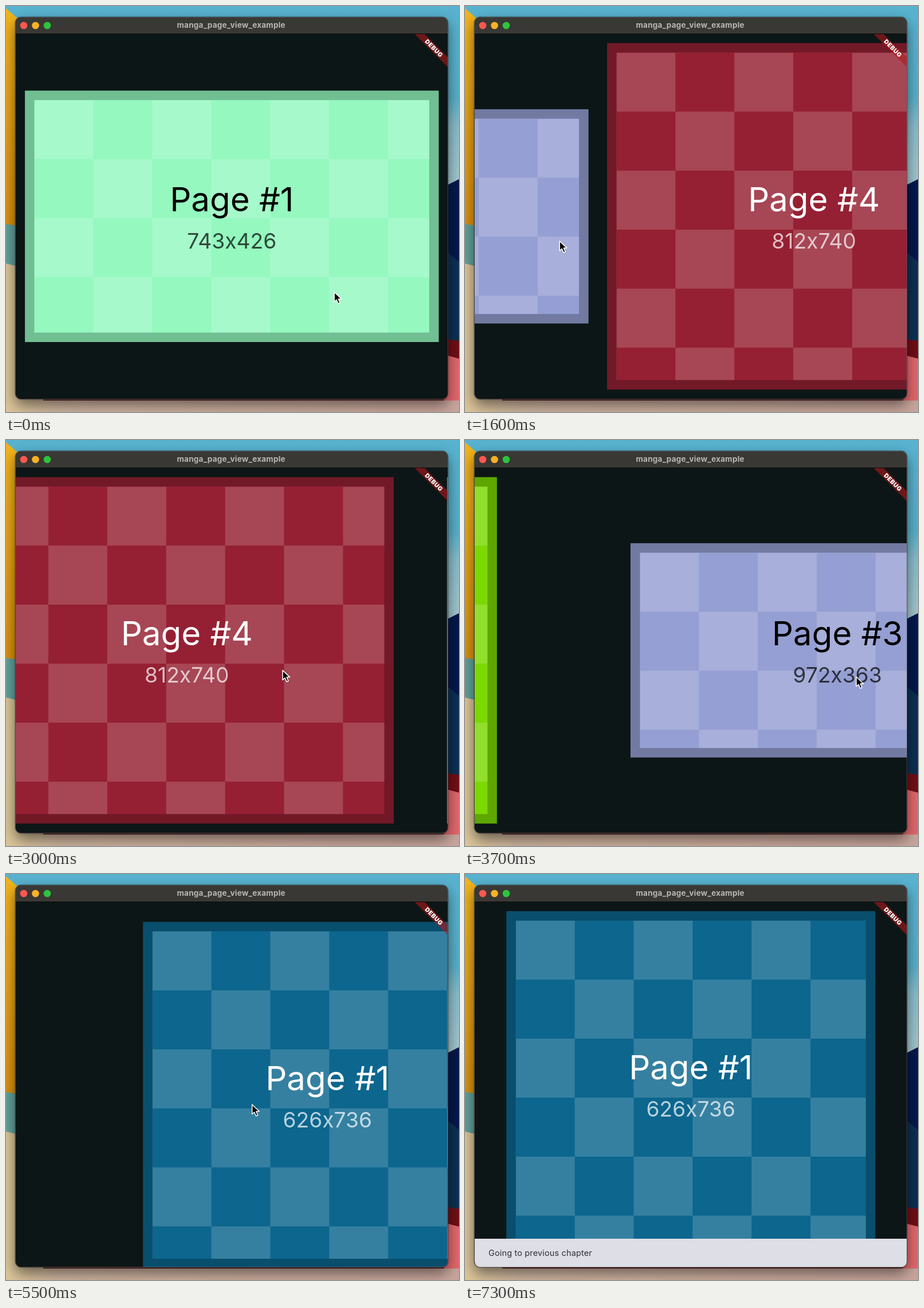
Write an HTML page that moves like this. It is 791 px wide and 708 px high and loops after 7.4 s.

```html
<!DOCTYPE html>
<html lang="en">
<head>
<meta charset="utf-8">
<title>manga_page_view_example</title>
<style>
  html, body { margin: 0; width: 100%; height: 100%; overflow: hidden; background: #111215; }
  svg { display: block; width: 791px; height: 708px; font-family: Inter, sans-serif; }
  .mid { text-anchor: middle; }
  .name { font-size: 58.2px; }
  .size { font-size: 37.2px; opacity: .7; }
</style>
</head>
<body>
<svg id="stage" viewBox="0 0 791 708">
  <defs>
    <linearGradient id="sky" x2="0" y2="1">
      <stop offset="0" stop-color="#58b3d0"/><stop offset=".5" stop-color="#58afc9"/>
      <stop offset=".65" stop-color="#88bdcb"/><stop offset="1" stop-color="#a6c8ce"/>
    </linearGradient>
    <linearGradient id="sun" x2="0" y2="1">
      <stop offset="0" stop-color="#f2b31c"/><stop offset="1" stop-color="#d99010"/>
    </linearGradient>
    <linearGradient id="sand">
      <stop offset="0" stop-color="#dcc698"/><stop offset=".12" stop-color="#cfb5a0"/>
      <stop offset="1" stop-color="#c8a59c"/>
    </linearGradient>
    <pattern id="checks" width="205.8" height="205.8" patternUnits="userSpaceOnUse">
      <path d="M0 0h102.9v102.9H0zM102.9 102.9h102.9v102.9H102.9z" fill="#fff" fill-opacity=".17"/>
    </pattern>
    <clipPath id="view"><path d="M17 49H771.5V676a9.5 9.5 0 0 1-9.5 9.5H26.5A9.5 9.5 0 0 1 17 676z"/></clipPath>
    <filter id="shade" x="-10%" y="-10%" width="120%" height="125%">
      <feDropShadow dx="0" dy="10" stdDeviation="12" flood-opacity=".5"/>
    </filter>
  </defs>

  <rect width="791" height="320" fill="url(#sky)"/>
  <path d="M0 4L24 25V390H0z" fill="url(#sun)"/>
  <path d="M0 380L24 384V460L0 449z" fill="#62a19b"/>
  <path d="M0 449L24 455V680H791V708H0z" fill="url(#sand)"/>
  <path d="M765 315L791 302V445H765z" fill="#05184c"/>
  <path d="M765 425L791 446V590H765z" fill="#0c3054"/>
  <path d="M765 580L791 584V618H765z" fill="#710e16"/>
  <path d="M765 608L791 615V688H765z" fill="#e2686d"/>
  <path d="M65 687H765" stroke="#6b2a2c" stroke-width="2"/>

  <rect x="16.5" y="19.5" width="755" height="666" rx="10" fill="#111215" stroke="#000"
    stroke-opacity=".5" stroke-width="2" filter="url(#shade)"/>
  <path d="M17 49V29.5a9.5 9.5 0 0 1 9.5-9.5H762a9.5 9.5 0 0 1 9.5 9.5V49z" fill="#393834"/>
  <path d="M17 48.5H771.5" stroke="#0b0b0c"/>
  <circle cx="31" cy="34" r="6.3" fill="#ff5750"/>
  <circle cx="51.5" cy="34" r="6.3" fill="#f8b127"/>
  <circle cx="72" cy="34" r="6.3" fill="#2cc43e"/>
  <text class="mid" x="393.2" y="38.3" font-size="13.5" font-weight="700" letter-spacing=".25"
    fill="#b9b7b3">manga_page_view_example</text>

  <g clip-path="url(#view)">
    <g id="pages"></g>
    <path id="spinner" fill="none" stroke="#a5c8f2" stroke-width="4.1"/>
    <path d="M713.6 49H731L772 89.7V107z" fill="#b0181b" fill-opacity=".6"/>
    <text class="mid" transform="translate(747.2 73.8) rotate(45)" y="3.7" font-size="10.5"
      font-weight="900" letter-spacing=".5" fill="#fff">DEBUG</text>
    <g id="snack">
      <rect x="16" width="757" height="60" fill="#dddee6"/>
      <text x="41" y="30" font-size="14.4" letter-spacing=".2" fill="#2c2e35">Going to previous chapter</text>
    </g>
  </g>
  <rect x="16.5" y="19.5" width="755" height="666" rx="10" fill="none" stroke="#777" stroke-opacity=".55"/>
  <path id="cursor" d="M1.2 2V18.8L5.1 15.2L8.2 22L11.2 20.7L8.3 14H13.8z" fill="#000"
    stroke="#fff" stroke-width="1.5" stroke-linejoin="round"/>
</svg>

<script>
const LOOP = 7400, STEP = 100;
const SLOT = 755, CX = 394.3, CY = 366.8, SCALE = 1.029, EDGE = 16.5;
const NEW_CHAPTER = 4500, LOADED = 2300;
const $ = id => document.getElementById(id);

// Page number, width, height, base colour, text colour
const pages = [
  [1, 743, 426, '#94f8bf', '#000'],
  [2, 312, 837, '#7bd900', '#000'],
  [3, 972, 363, '#959fd3', '#000'],
  [4, 812, 740, '#952033', '#fff'],
  [5, 584, 705, '#c9a0dc', '#000'],
  [1, 626, 736, '#0c668e', '#fff']
].map(makePage);

function makePage([no, w, h, fill, ink]) {
  const W = Math.min(w * SCALE, 722.5), H = Math.min(h * SCALE, 604);
  const inner = `width="${W - 2 * EDGE}" height="${H - 2 * EDGE}"`;
  const el = document.createElementNS('http://www.w3.org/2000/svg', 'g');
  el.innerHTML = `
    <g transform="translate(${-W / 2} ${-H / 2})">
      <rect width="${W}" height="${H}" fill="${fill}"/>
      <rect width="${W}" height="${H}" fill-opacity=".235"/>
      <g transform="translate(${EDGE} ${EDGE})">
        <rect ${inner} fill="${fill}"/><rect ${inner} fill="url(#checks)"/>
      </g>
    </g>
    <text class="mid name" y="-8.8" fill="${ink}">Page #${no}</text>
    <text class="mid size" y="56.4" fill="${ink}">${w}x${h}</text>`;
  $('pages').append(el);
  return { no, el };
}

const clamp = (v, lo, hi) => Math.min(hi, Math.max(lo, v));
const smooth = u => u * u * (3 - 2 * u);
const ramp = (t, start, span) => smooth(clamp((t - start) / span, 0, 1));

// Number of pages turned by four equal flicks, each eased
function flicks(t, start, period) {
  const n = clamp((t - start) / period, 0, 4), whole = Math.floor(n);
  return whole + smooth(n - whole);
}

// Pointer stops: time, x, y
const stops = [[0, 572, 497], [1100, 138, 433], [2100, 190, 383], [3700, 682, 411],
  [4800, 317, 391], [6200, 540, 409], [7000, 830, 500]];

function pointer(t) {
  let [, x, y] = stops[0];
  for (let i = 1; i < stops.length; i++) {
    const [t0, x0, y0] = stops[i - 1], [t1, x1, y1] = stops[i];
    const k = ramp(t, t0, t1 - t0);
    x += (x1 - x0) * k;
    y += (y1 - y0) * k;
  }
  return [x, y];
}

const move = (el, x, y) => el.setAttribute('transform', `translate(${x} ${y})`);
const show = (el, on) => el.setAttribute('visibility', on ? 'visible' : 'hidden');

function arc(x, y, r, from, sweep) {
  const at = a => `${x + r * Math.cos(a)} ${y + r * Math.sin(a)}`;
  return `M${at(from)}A${r} ${r} 0 ${sweep > Math.PI ? 1 : 0} 1 ${at(from + sweep)}`;
}

function draw(t) {
  const pos = 1 + flicks(t, 494, 417.7) - flicks(t, 2648, 440);
  const pull = ramp(t, NEW_CHAPTER, 300);
  const dx = 167 * pull * (1 - ramp(t, 5900, 422));
  const dy = 148 * pull * (1 - ramp(t, 4800, 900));
  const changed = t >= NEW_CHAPTER;

  pages.forEach(({ no, el }, i) => {
    const x = (no - pos) * SLOT + dx;
    move(el, CX + x, CY + dy);
    show(el, (i === 5) === changed && Math.abs(x) < SLOT && (no !== 5 || t >= LOADED));
  });

  const waiting = t < LOADED && pos > 4;
  show($('spinner'), waiting);
  if (waiting) {
    const late = t - 2100;
    $('spinner').setAttribute('d',
      arc(CX + (5 - pos) * SLOT, CY, 15.3, 1.84 + late * .004, .3 + Math.abs(late) * .006));
  }

  move($('snack'), 0, 686 - 50 * ramp(t, 5950, 287));
  move($('cursor'), ...pointer(t));
}

function tick(now) {
  draw(Math.floor(now % LOOP / STEP) * STEP);
  requestAnimationFrame(tick);
}
draw(0);
requestAnimationFrame(tick);
</script>
</body>
</html>
```
